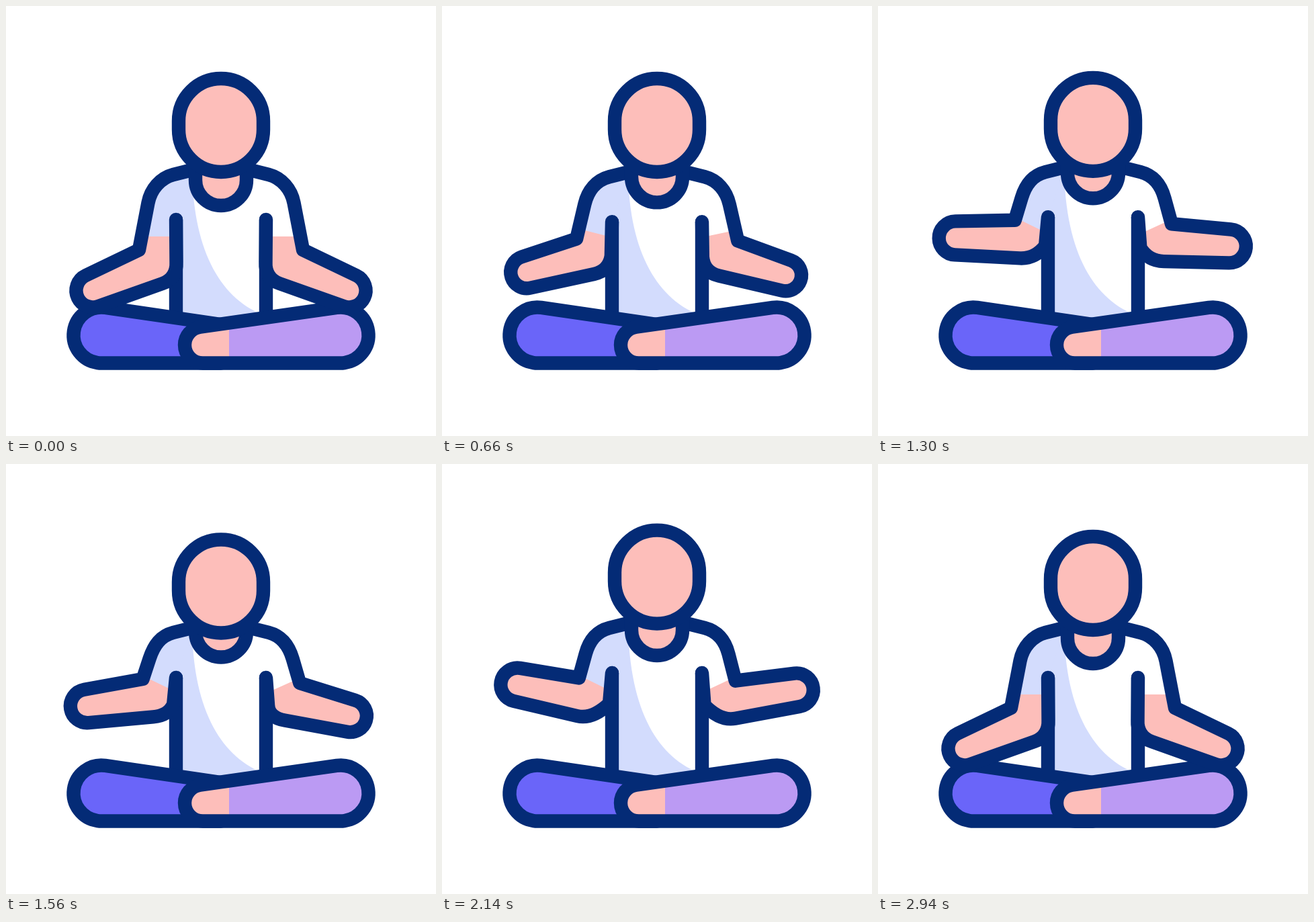
An HTML page with a canvas for the animation above (3.3 s loop, 640 by 640 pixels).

```html
<!DOCTYPE html>
<html lang="en">
<head>
<meta charset="utf-8">
<title>Meditation</title>
<style>
  html, body { margin: 0; width: 100%; height: 100%; overflow: hidden; background: #fff; }
  canvas { display: block; width: 100vmin; height: 100vmin; }
</style>
</head>
<body>
<canvas id="stage" width="640" height="640"></canvas>
<script>
const ctx = document.getElementById('stage').getContext('2d');
const LOOP = 3300, STEP = 20;
const NAVY = '#042b76', SKIN = '#fdbeba', SHADE = '#d3dcfd', WHITE = '#fff';
const LEG_LEFT = '#6a65f9', LEG_RIGHT = '#bb9af3';
const DEG = Math.PI / 180;

// Every part rests, dips, rises, hovers, rises again, dips and rests.
const BEATS = [200, 450, 1000, 1570, 2120, 2480, 2930];
const part = (rest, lag, dip, up, hover, sink) =>
  ({ lag, poses: [rest, dip, up, hover, up, sink, rest] });

const parts = {
  head: part(0, -30, 7, -10.5, 4.5, 12.6),
  collar: part(0, -20, 0, -12.5, -9.5, 5),
  torso: part(0, 30, 6.5, -7, 0, 5),
  liftL: part(0, -20, 1, -46, -43, 1),
  liftR: part(0, -10, 1, -41, -37, 1),
  bendL: part(41.4, 0, 47, 6, 26, 47.7),
  bendR: part(41.4, 10, 47, 8.5, 33, 46)
};

function poseAt({ lag, poses }, t) {
  const last = BEATS.length - 1;
  const time = i => BEATS[i] + (i > 0 && i < last ? lag : 0);
  if (t <= time(0) || t >= time(last)) return poses[0];
  let i = 0;
  while (t >= time(i + 1)) i++;
  const p = (t - time(i)) / (time(i + 1) - time(i));
  return poses[i] + (poses[i + 1] - poses[i]) * (0.5 - 0.5 * Math.cos(Math.PI * p));
}

function mirrored(draw) {
  ctx.save();
  ctx.translate(640, 0);
  ctx.scale(-1, 1);
  draw();
  ctx.restore();
}

function fill(color, path) {
  ctx.fillStyle = color;
  path ? ctx.fill(path) : ctx.fill();
}

function drawShade(torso) {
  ctx.beginPath();
  ctx.moveTo(277, 246 + torso);
  ctx.bezierCurveTo(279, 370, 323, 438, 386, 461);
  ctx.lineTo(320, 470);
  ctx.lineTo(253, 462);
  ctx.lineTo(253, 318 + torso);
  ctx.lineTo(236, 282 + torso);
  fill(SHADE);
}

function drawSide(torso) {
  ctx.beginPath();
  ctx.moveTo(253, 318 + torso);
  ctx.lineTo(253, 462);
  ctx.stroke();
}

function drawLegs() {
  ctx.beginPath();
  ctx.moveTo(320, 474);
  ctx.arc(142, 490, 41.5, 278 * DEG, 90 * DEG, true);
  ctx.lineTo(320, 531.5);
  ctx.closePath();
  fill(LEG_LEFT);
  ctx.stroke();

  const leg = new Path2D();
  leg.arc(293, 504.5, 27, 90 * DEG, 262 * DEG);
  leg.arc(498, 490, 41.5, 262 * DEG, 90 * DEG);
  leg.closePath();
  fill(LEG_RIGHT, leg);
  ctx.save();
  ctx.clip(leg);
  ctx.fillStyle = SKIN;
  ctx.fillRect(250, 440, 82, 100);
  ctx.restore();
  ctx.stroke(leg);
}

function drawArm(lift, bend, torso, sleeve) {
  // The forearm shrinks a little halfway through its swing.
  const fold = Math.max(0, 1 - Math.abs(bend - 36) / 6);
  const r = 25 - 1.5 * fold, len = 92 - 4.5 * fold;
  const ex = 198 - lift * 0.13, ey = 363 + lift;
  const hx = ex - len * Math.cos(bend * DEG), hy = ey + len * Math.sin(bend * DEG);
  const ux = 233 + (bend - 41.4) * 0.9, uy = 413 + lift * 0.85;
  const sx = 211.5 - lift * 0.05, sy = 293 + torso + lift * 0.08;

  // Angle on the hand circle where a line from (x, y) touches it.
  const touch = (x, y, side) =>
    Math.atan2(y - hy, x - hx) + side * Math.acos(r / Math.hypot(x - hx, y - hy));
  const from = touch(ex, ey, -1), to = touch(ux, uy, 1);
  const px = hx + r * Math.cos(to), py = hy + r * Math.sin(to);
  const k = 23 / Math.hypot(ux - px, uy - py);
  const s = 21 / Math.hypot(ex - sx, ey - sy);

  const arm = new Path2D();
  arm.moveTo(279, 243.5 + torso);
  arm.lineTo(249, 251 + torso);
  arm.bezierCurveTo(230, 256 + torso, sx - (ex - sx) * s, sy - (ey - sy) * s, sx, sy);
  arm.lineTo(ex, ey);
  arm.arc(hx, hy, r, from, to, true);
  arm.lineTo(ux, uy);
  arm.quadraticCurveTo(ux + (ux - px) * k, uy + (uy - py) * k,
    253.5 + lift * 0.1, 381 + lift * 0.55);
  arm.lineTo(253, 318 + torso);
  fill(sleeve, arm);

  // Bare skin: the forearm, and the upper arm below the tilted cuff.
  const outer = 343 + lift * 0.55, inner = 343 - lift * lift * 0.0047;
  const slope = (inner - outer) / 31;
  ctx.save();
  ctx.clip(arm);
  ctx.beginPath();
  ctx.moveTo(60, 250);
  ctx.lineTo(190, 250);
  ctx.lineTo(190, outer - 22 * slope);
  ctx.lineTo(265, inner + 22 * slope);
  ctx.lineTo(265, 500);
  ctx.lineTo(60, 500);
  fill(SKIN);
  ctx.restore();
  ctx.stroke(arm);
}

function drawNeck(dy) {
  ctx.beginPath();
  ctx.moveTo(282, 244 + dy);
  ctx.arc(320, 259 + dy, 38, Math.PI, 0, true);
  ctx.lineTo(358, 244 + dy);
  fill(SKIN);
  ctx.stroke();
}

function drawHead(dy) {
  ctx.beginPath();
  ctx.roundRect(257, 108 + dy, 126, 139, 63);
  fill(SKIN);
  ctx.stroke();
}

function render(t) {
  const v = {};
  for (const name in parts) v[name] = poseAt(parts[name], t);
  ctx.fillStyle = WHITE;
  ctx.fillRect(0, 0, 640, 640);
  ctx.strokeStyle = NAVY;
  ctx.lineWidth = 20.4;
  ctx.lineCap = ctx.lineJoin = 'round';

  drawShade(v.torso);
  drawSide(v.torso);
  mirrored(() => drawSide(v.torso));
  drawLegs();
  drawArm(v.liftL, v.bendL, v.torso, SHADE);
  mirrored(() => drawArm(v.liftR, v.bendR, v.torso, WHITE));
  drawNeck(v.collar);
  drawHead(v.head);
}

const start = performance.now();
function tick() {
  const t = (performance.now() - start) % LOOP;
  render(Math.floor(t / STEP) * STEP);
  requestAnimationFrame(tick);
}
tick();
</script>
</body>
</html>
```
